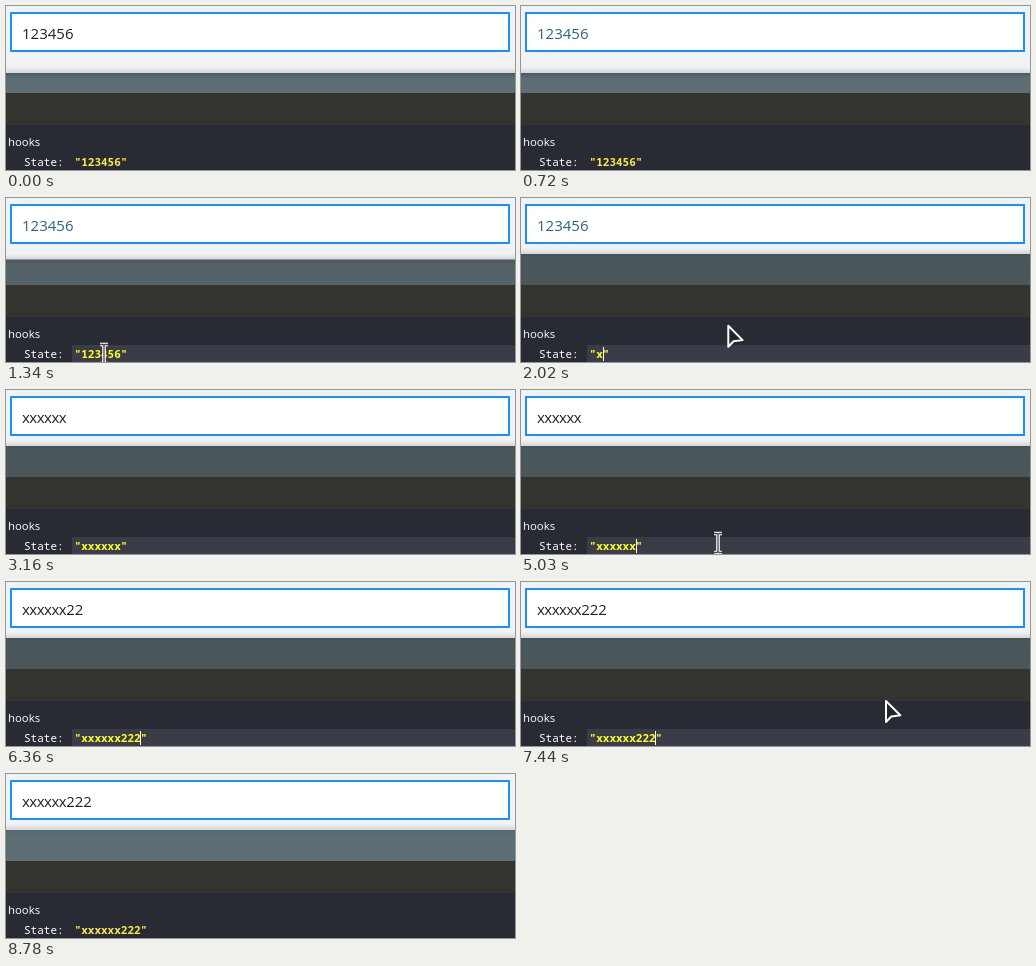
An HTML page that plays this animation: 509 by 164 pixels, repeating every 8.86 s.

```html
<!DOCTYPE html>
<html lang="en">
<head>
<meta charset="utf-8">
<title>Editing hook state</title>
<style>
  html, body { margin: 0; width: 100%; height: 100%; overflow: hidden; background: #f0f2f5; }
  svg { display: block; width: 509px; height: 164px; }
  text { white-space: pre; }
  .field { font: 15px "Open Sans", sans-serif; }
  .letters { letter-spacing: -.5px; }
  .hooks { font: 500 11.4px "Open Sans", sans-serif; fill: #fff; }
  .mono { font: 500 11px "Noto Sans Mono", monospace; }
  #value { font-weight: 600; }
</style>
</head>
<body>
<svg viewBox="0 0 509 164">
  <defs>
    <linearGradient id="shade" x2="0" y2="1">
      <stop stop-color="#222c30" stop-opacity=".3"/>
      <stop offset="1" stop-color="#222c30" stop-opacity="0"/>
    </linearGradient>
    <linearGradient id="edge" x2="0" y2="1">
      <stop stop-color="#d6d7da" stop-opacity="0"/>
      <stop offset="1" stop-color="#d6d7da"/>
    </linearGradient>
    <filter id="soft"><feGaussianBlur stdDeviation="1.5"/></filter>
    <path id="beamShape" d="M-4-9.5H-1L0-8.5 1-9.5H4M0-8.5V8.5M-4 9.5H-1L0 8.5 1 9.5H4"/>
  </defs>
  <rect width="509" height="164" fill="#f0f2f5"/>
  <rect id="glow" x="4" y="6" width="500" height="40" fill="none" stroke="#1890ff" stroke-opacity=".3" stroke-width="4" filter="url(#soft)"/>
  <rect x="5" y="7" width="498" height="38" fill="#fff" stroke="#1890ff" stroke-width="2"/>
  <text class="field" x="16" y="33"><tspan id="letters" class="letters"></tspan><tspan id="digits"></tspan></text>
  <g id="strip">
    <rect y="-6" width="509" height="6" fill="url(#edge)"/>
    <rect id="stripFill" width="509" height="40"/>
    <rect id="stripShade" width="509" height="5" fill="url(#shade)"/>
  </g>
  <rect y="87" width="509" height="32" fill="#333330"/>
  <rect y="119" width="509" height="45" fill="#282a34"/>
  <text class="hooks" x="2" y="140">hooks</text>
  <rect id="row" x="66" y="147" width="443" height="17" fill="#3a3d47"/>
  <rect id="selection" x="75" y="149" width="40" height="14" fill="#5b6f96"/>
  <text class="mono" x="18" y="160" fill="#fff">State:</text>
  <text class="mono" id="value" x="68.6" y="160"></text>
  <rect id="caret" y="149" width="1" height="14" fill="#fff"/>
  <path id="arrow" d="M1 1V22L6.3 16.5 15.3 15.3Z" fill="#25262c" stroke="#fff" stroke-width="2" stroke-linejoin="round"/>
  <g id="beam" fill="none">
    <use href="#beamShape" stroke="#fff" stroke-width="3.6"/>
    <use href="#beamShape" stroke="#484c50" stroke-width="1.3"/>
  </g>
</svg>
<script>
const LOOP = 8860, BLINK = 530;
const EDIT_START = 1340, EDIT_END = 8780, FIELD_UPDATE = 3090;
const LETTERS = { first: 1880, gap: 146, count: 6 };
const TWOS = { first: 5830, gap: 250, count: 3 };

// The pointer glides, rests at its goal, and disappears at `until`.
const GLIDES = [
  { at: 920, takes: 270, from: [98, 170], to: [98, 156], until: 1880 },
  { at: 1880, takes: 280, from: [179, 144], to: [233, 110], until: 2870 },
  { at: 3490, takes: 350, from: [233, 110], to: [88, 33.5], until: 4260 },
  { at: 4260, takes: 770, from: [88, 33.5], to: [197, 153], until: 5170 },
  { at: 5170, takes: 130, from: [197, 153], to: [223, 158], until: 5760 },
  { at: 6820, takes: 620, from: [223, 145], to: [364, 118], until: 7450 },
  { at: 7450, takes: 200, from: [364, 118], to: [432, 152], until: 7720 }
];

const el = Object.fromEntries([...document.querySelectorAll('[id]')].map(e => [e.id, e]));
const ramp = (t, from, to) => Math.min(1, Math.max(0, (t - from) / (to - from)));
const stepped = (k, n) => Math.ceil(k * n) / n;
const lerp = (a, b, k) => a.map((v, i) => v + (b[i] - v) * k);
const rgb = c => `rgb(${c.map(Math.round)})`;
const show = (e, on) => e.setAttribute('visibility', on ? 'visible' : 'hidden');
const place = (e, x, y) => e.setAttribute('transform', `translate(${x} ${y})`);
const typed = ({ first, gap, count }, t) => Math.min(count, Math.max(0, Math.floor((t - first) / gap) + 1));
const lastKeyTime = ({ first, gap }, n) => first + gap * (n - 1);

function drawPointer(t) {
  const glide = GLIDES.find(g => t >= g.at && t < g.until);
  const k = glide ? ramp(t, glide.at, glide.at + glide.takes) : 0;
  const [x, y] = glide ? lerp(glide.from, glide.to, k * k * (3 - 2 * k)) : [0, 0];
  const overText = y < 46 || y > 147 && x < 300;
  show(el.beam, glide && overText);
  show(el.arrow, glide && !overText);
  place(el.beam, x, y);
  place(el.arrow, x, y);
}

function draw(t) {
  const editing = t >= EDIT_START && t < EDIT_END;
  const letters = typed(LETTERS, t), twos = typed(TWOS, t);

  // Input field; new digits arrive shortly after they are typed
  const updated = t >= FIELD_UPDATE;
  el.letters.textContent = updated ? 'xxxxxx' : '';
  el.digits.textContent = updated ? '2'.repeat(typed(TWOS, t - 100)) : '123456';
  const tint = updated ? 0 : stepped(ramp(t, 329, 720), 4);
  el.letters.style.fill = el.digits.style.fill = rgb(lerp([34, 34, 36], [43, 98, 128], tint));
  el.glow.setAttribute('opacity', ramp(t, 3800, 3980) * (1 - ramp(t, 4500, 4800)));

  // Page edge and backdrop
  const dim = stepped(ramp(t, EDIT_START - 1, 1480), 2);
  place(el.strip, 0, 67 - 11 * dim);
  el.stripFill.setAttribute('fill', rgb(lerp([92, 110, 115], [75, 86, 91], editing ? dim : 0)));
  el.stripShade.setAttribute('opacity', 1 - .7 * dim);

  // State value
  show(el.row, editing);
  show(el.selection, t >= 1480 && t < LETTERS.first);
  el.value.textContent = `"${letters ? 'x'.repeat(letters) + '2'.repeat(twos) : '123456'}"`;
  el.value.setAttribute('fill', editing ? '#ffff1c' : '#fbe94b');
  const lastKey = twos ? lastKeyTime(TWOS, twos) : lastKeyTime(LETTERS, letters);
  show(el.caret, editing && letters && Math.floor((t - lastKey) / BLINK) % 2 === 0);
  el.caret.setAttribute('x', Math.floor(68.9 + 6.6 * (letters + twos + 1)));

  drawPointer(t);
}

const start = performance.now();
function tick() {
  draw((performance.now() - start) % LOOP);
  requestAnimationFrame(tick);
}
tick();
</script>
</body>
</html>
```
